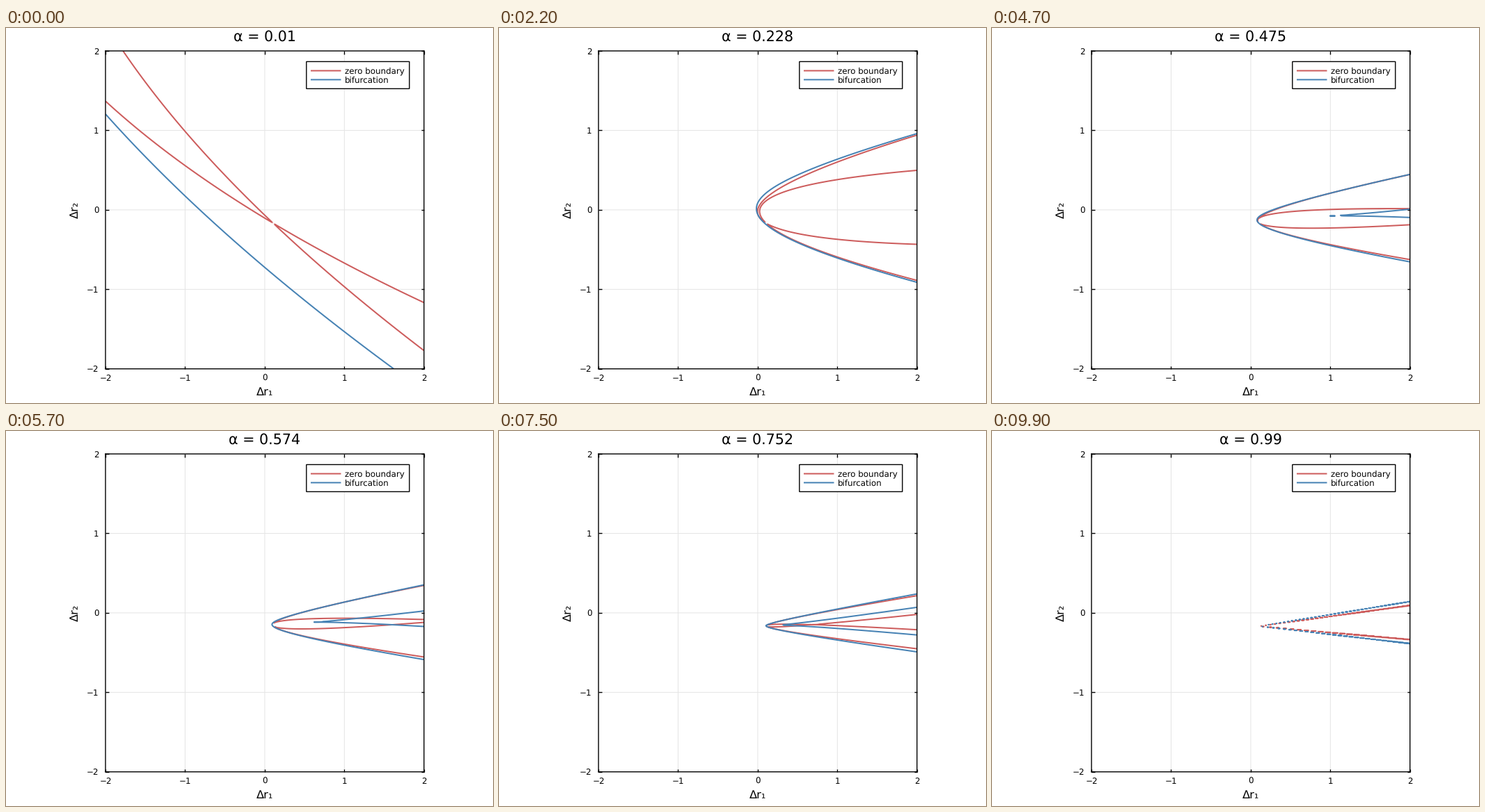
Animation of 700x540 px, one loop 10 s. Source, as a matplotlib script:

```python
import numpy as np
import matplotlib.pyplot as plt
from matplotlib.animation import FuncAnimation
from matplotlib.patches import Rectangle

plt.rcParams["text.hinting"] = "none"
plt.rcParams["path.snap"] = False

W, H, DPI = 700, 540, 100
PX = 72 / DPI
FRAMES, INTERVAL = 100, 100
RED, BLUE = "indianred", "steelblue"
LEFT, RIGHT, TOP, BOTTOM = 143, 600.8, 33, 490.8
SMALL, LABEL, TITLE = 8.52, 11.7, 14.9

# Quadratic map (v, w) -> (dr1, dr2):
# ORIGIN + (1 - a) * (v*LV + w*LW) + a * (v^2*QV + w^2*QW + v*w*QVW)
ORIGIN = (0.106, -0.1678)
LV, LW = (-0.35406, 0.33595), (-0.408, 0.2437)
QV, QW, QVW = (1, -0.0889), (1, 0.138), (1.165, 0.029)

grid = np.linspace(-2, 2, 500)
X, Y = np.meshgrid(grid - ORIGIN[0], grid - ORIGIN[1])


def cross(p, q):
    return p[0] * q[1] - p[1] * q[0]


def axis_image(lin, quad, s):
    """Implicit parabola traced by one coordinate axis."""
    k = cross(quad, lin)
    u = quad[0] * Y - quad[1] * X
    v = lin[1] * X - lin[0] * Y
    return u * u - s * k * v


# Dual cubic of the fold curve in the line slope p
DET = np.polysub(np.polymul(QV, QW), np.polymul(QVW, QVW) / 4)
NUM = (np.polymul(np.polymul(LV, LV), QW)
       - np.polymul(np.polymul(LV, LW), QVW)
       + np.polymul(np.polymul(LW, LW), QV))


def fold(s):
    """Discriminant of the dual cubic: zero on the fold curve."""
    d2, d1, d0 = 4 * DET
    n3, n2, n1, n0 = s * NUM
    a = d2 * X + n3
    b = d1 * X + d2 * Y + n2
    c = d0 * X + d1 * Y + n1
    d = d0 * Y + n0
    bb, cc, ad = b * b, c * c, a * d
    return bb * cc - 4 * a * c * cc - 4 * b * bb * d - 27 * ad * ad + 18 * ad * b * c


fig = plt.figure(figsize=(W / DPI, H / DPI), dpi=DPI, facecolor="white")
ax = fig.add_axes([LEFT / W, 1 - BOTTOM / H, (RIGHT - LEFT) / W, (BOTTOM - TOP) / H])
ax.set(xlim=(-2, 2), ylim=(-2, 2), xticks=range(-2, 3), yticks=range(-2, 3))
ax.tick_params(direction="in", length=4.5 * PX, width=1, top=True, right=True,
               labelbottom=False, labelleft=False)
ax.grid(color="#e5e5e5", lw=PX, snap=False)
ax.set_axisbelow(True)
for side in ax.spines.values():
    side.set(linewidth=1, snap=False)
for tick in ax.xaxis.get_major_ticks() + ax.yaxis.get_major_ticks():
    tick.tick1line.set_snap(False)
    tick.tick2line.set_snap(False)

# Overlay in pixel coordinates for text and legend
top = fig.add_axes([0, 0, 1, 1], zorder=5)
top.set(xlim=(0, W), ylim=(H, 0))
top.axis("off")


def label(x, y, text, size=SMALL, ha="center", **kw):
    return top.text(x, y, text, fontsize=size, ha=ha, va="baseline",
                    family="DejaVu Sans", **kw)


for t in range(-2, 3):
    name = str(t).replace("-", "\u2212")
    frac = (t + 2) / 4
    label(LEFT + frac * (RIGHT - LEFT), 507.7, name)
    label(133.5, BOTTOM - frac * (BOTTOM - TOP) + 4.6, name, ha="right")

label(372, 529, "Δr₁", LABEL)
label(103.5, 262, "Δr₂", LABEL, rotation=90, rotation_mode="anchor")
title = label(372, 18.4, "", TITLE)

top.add_patch(Rectangle((431.8, 48.4), 148, 39, fc="white", ec="black", lw=1,
                        snap=False))
for y, color, name in ((61.5, RED, "zero boundary"), (74.4, BLUE, "bifurcation")):
    top.plot([438, 481.5], [y, y], color=color, lw=2 * PX,
             solid_capstyle="butt", snap=False)
    label(487, y + 4.4, name, ha="left")

lines = []


def update(i):
    while lines:
        lines.pop().remove()
    a = 0.01 + 0.98 * i / (FRAMES - 1)
    s = (1 - a) ** 2 / a
    title.set_text(f"α = {round(a, 3)}")
    zero = axis_image(LV, QV, s) * axis_image(LW, QW, s)
    for field, color in ((zero, RED), (fold(s), BLUE)):
        lines.append(ax.contour(grid, grid, field, levels=[0], colors=[color],
                                linewidths=2 * PX))


anim = FuncAnimation(fig, update, frames=FRAMES, interval=INTERVAL,
                     repeat=True, repeat_delay=0, blit=False)
plt.show()
```
